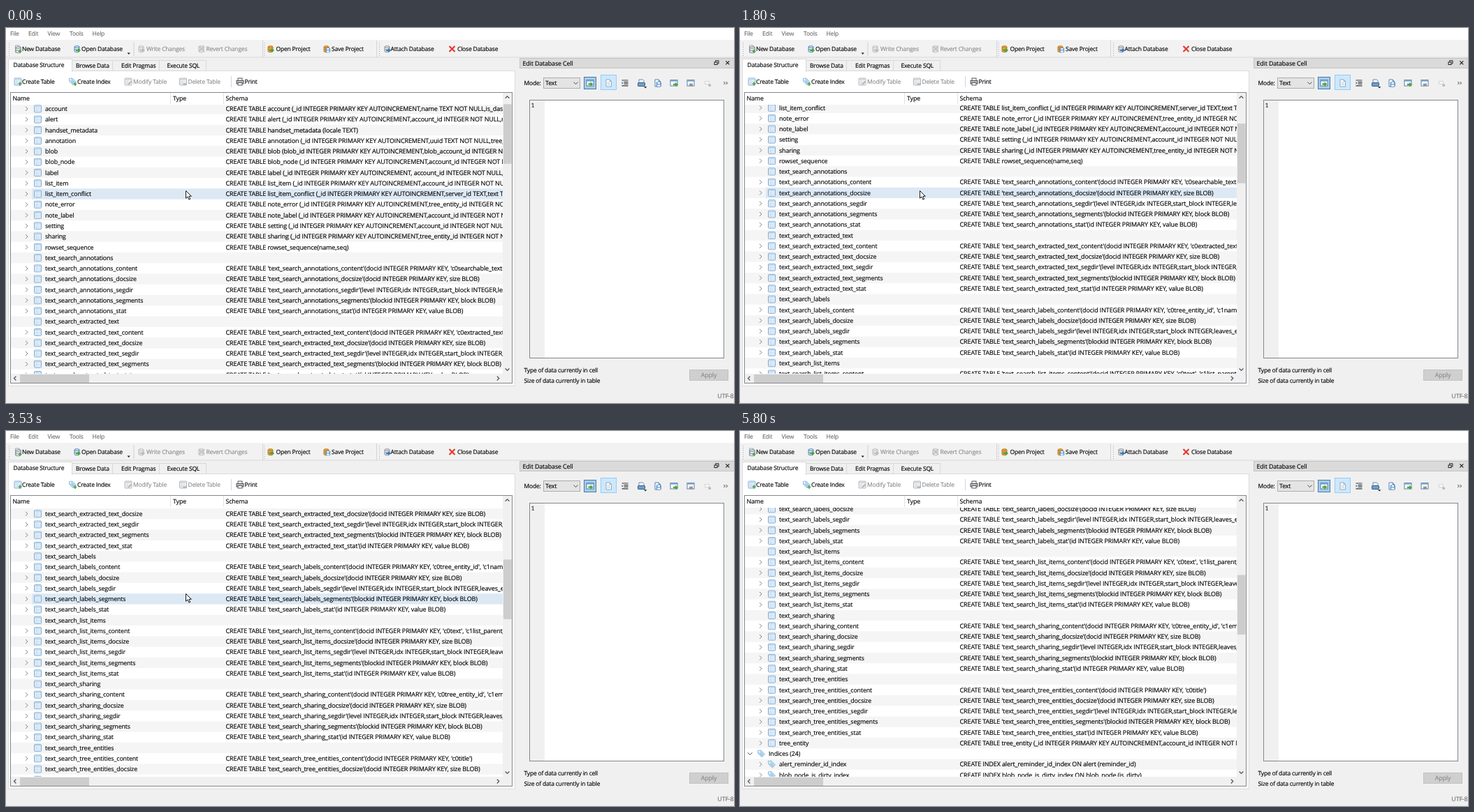
Write an HTML page that moves like this. It is 1042x538 px and loops after 6790 ms.

```html
<!DOCTYPE html>
<html lang="en">
<head>
<meta charset="utf-8">
<title>Database structure</title>
<style>
html, body { margin: 0; width: 100%; height: 100%; overflow: hidden; background: #f0f0f0; }
svg { display: block; }
text {
  font: 8.8px "Open Sans", "Noto Sans", sans-serif; letter-spacing: -.1px; white-space: pre;
  text-rendering: geometricPrecision; fill: currentColor; stroke: currentColor; stroke-width: .15px;
}
text.ui { font-size: 8.5px; letter-spacing: -.2px; }
text.sql { font-size: 9px; letter-spacing: -.12px; }
text.mono { font: 8.5px "Noto Sans Mono", "DejaVu Sans Mono", monospace; }
</style>
</head>
<body>
<svg id="stage" width="1042" height="538" viewBox="0 0 1042 538" xmlns="http://www.w3.org/2000/svg"></svg>
<script>
const LOOP = 6790, TICK = 200 / 3;
const ROW = 15.265, TOP = 108.3;
const LEFT = 7, RIGHT = 711;

// Scroll offsets and pointer heights, one value per tick from each start tick.
const SCROLL = [
  [1, [2, 6]],
  [4, [9, 15, 24, 34, 44, 53, 60, 64]],
  [19, [68, 74, 81, 88, 96, 104, 111, 118, 123.7, 127, 129]],
  [34, [134, 146, 164, 184, 203, 218, 226]],
  [47, [231.8, 246, 267, 290, 312, 326, 333]],
  [60, [339, 354, 375, 396, 414, 426, 431.5]]
];
const POINTER = [
  [77, [246, 296, 368, 430, 456.5]],
  [85, [484, 518, 560]]
];

// Drawing helpers
const rect = (x, y, w, h, fill, stroke = 'none', more = '') =>
  `<rect x="${x}" y="${y}" width="${w}" height="${h}" fill="${fill}" stroke="${stroke}" ${more}/>`;
const path = (d, stroke, fill = 'none', width = 1) =>
  `<path d="${d}" stroke="${stroke}" fill="${fill}" stroke-width="${width}"/>`;
const circle = (x, y, r, fill, stroke = 'none') =>
  `<circle cx="${x}" cy="${y}" r="${r}" fill="${fill}" stroke="${stroke}"/>`;
const text = (x, y, s, color = '#000', cls = '', more = '') =>
  `<text x="${x}" y="${y}" color="${color}" class="${cls}" ${more}>${s}</text>`;
const ui = (x, y, s, color, more) => text(x, y, s, color, 'ui', more);
const at = (x, y, s) => `<g transform="translate(${x} ${y})">${s}</g>`;
const vline = (x, y, h, color) => rect(x, y, 1, h, color);

// Icons, each centred on 0,0
const icon = {
  grid: (edge = '#86add3', fill = '#e3effa', head = '#c3dbf1') =>
    rect(-5, -5, 10, 10, fill, edge, 'rx=".8"') + rect(-4.5, -4.5, 9, 2.2, head) +
    path('M-4.5 .3H4.5M-4.5 2.7H4.5M-1.5 -2V4.5', '#c6d9ea', 'none', .7),
  tag: () => path('M-5.2 -4.6L-.6 -5L5 .8L.8 5L-4.8 -.4Z', '#86b4d8', '#b9dcf3', .8) +
    circle(-3.3, -2.9, 1, '#fff') + path('M-1 -1.6L2.4 2M-2 0L1 2.8', '#7fa9cc', 'none', .7),
  drum: (edge = '#7d8790', fill = '#dfe5ea') =>
    path('M-4 -3V3.5C-4 5.2 3 5.2 3 3.5V-3C3 -4.8 -4 -4.8 -4 -3C-4 -1.4 3 -1.4 3 -3', edge, fill, .9) +
    path('M-4 .3C-4 1.8 3 1.8 3 .3', edge, 'none', .8),
  page: (edge = '#8aa0b5') => path('M-3.5 -5H1.5L4 -2.5V5H-3.5Z', edge, '#fff', .9) +
    path('M1.5 -5V-2.5H4', edge, 'none', .8),
  lines: color => path('M-2 -1H2.5M-2 .8H2.5M-2 2.6H2.5', color, 'none', .8),
  arrow: (color, x = 1, y = 2) => at(x, y, path('M-3 -1.2H0V-3.2L4 0L0 3.2V1.2H-3Z', 'none', color)),
  disk: (edge, fill) => rect(-4.5, -4.5, 9, 9, fill, edge, 'rx="1"') +
    rect(-2.5, -4.3, 5, 3, '#fff') + rect(-3, .8, 6, 3.6, '#f4f7fa'),
  plus: (color, x, y) => at(x, y, path('M-2.4 0H2.4M0 -2.4V2.4', color, 'none', 1.6)),
  cross: color => path('M-4 -4L4 4M4 -4L-4 4', color, 'none', 2.2)
};

function tableRows() {
  const id = '(_id INTEGER PRIMARY KEY AUTOINCREMENT,';
  const account = id + 'account_id INTEGER NOT NULL,remote_id TEXT';
  const entity = id + 'tree_entity_id INTEGER NOT NULL,remote_id TEXT';
  const plain = [
    ['account', id + 'name TEXT NOT NULL,is_dasher INTEGER'],
    ['alert', account],
    ['handset_metadata', '(locale TEXT)'],
    ['annotation', id + 'uuid TEXT NOT NULL,tree_entity_id INTEGER'],
    ['blob', '(blob_id INTEGER PRIMARY KEY AUTOINCREMENT,blob_account_id INTEGER NOT NULL'],
    ['blob_node', account],
    ['label', id + ' account_id INTEGER NOT NULL, uuid TEXT'],
    ['list_item', account],
    ['list_item_conflict', id + 'server_id TEXT,text TEXT'],
    ['note_error', entity],
    ['note_label', account],
    ['setting', account],
    ['sharing', entity]
  ];
  const make = ([name, body]) => ({ name, sql: `CREATE TABLE ${name} ${body}` });
  const rows = plain.map(make);
  rows.push({ name: 'rowset_sequence', sql: 'CREATE TABLE rowset_sequence(name,seq)' });
  const search = {
    annotations: "'c0searchable_text', 'c1uuid')",
    extracted_text: "'c0extracted_text', 'c1uuid')",
    labels: "'c0tree_entity_id', 'c1name')",
    list_items: "'c0text', 'c1list_parent_id')",
    sharing: "'c0tree_entity_id', 'c1email')",
    tree_entities: "'c0title')"
  };
  for (const [key, content] of Object.entries(search)) {
    const base = 'text_search_' + key;
    const parts = {
      content: 'docid INTEGER PRIMARY KEY, ' + content,
      docsize: 'docid INTEGER PRIMARY KEY, size BLOB)',
      segdir: 'level INTEGER,idx INTEGER,start_block INTEGER,leaves_end_block INTEGER)',
      segments: 'blockid INTEGER PRIMARY KEY, block BLOB)',
      stat: 'id INTEGER PRIMARY KEY, value BLOB)'
    };
    rows.push({ name: base });
    for (const p in parts)
      rows.push({ name: `${base}_${p}`, sql: `CREATE TABLE '${base}_${p}'(${parts[p]}` });
  }
  rows.push(make(['tree_entity', account]));
  return rows;
}

const rows = tableRows();
const HEAD = rows.length;
rows.push({ name: 'Indices (24)' });
for (const [name, on] of [
  ['alert_reminder_id_index', 'alert (reminder_id)'],
  ['blob_node_is_dirty_index', 'blob_node (is_dirty)'],
  ['blob_node_tree_entity_id_index', 'blob_node (tree_entity_id)']
]) rows.push({ name, sql: `CREATE INDEX ${name} ON ${on}`, tag: true });

const rowTop = i => TOP + i * ROW;

function rowArt(row, i) {
  const y = rowTop(i), mid = y + ROW / 2;
  if (i === HEAD)
    return path(`M11 ${mid - 1.6}l3.2 3.2l3.2 -3.2`, '#404040') +
      at(30.5, mid, icon.tag()) + text(41, y + 10.8, row.name);
  return (row.sql ? path(`M28 ${mid - 3}l3 3l-3 3`, '#808080') : '') +
    at(45.5, mid, row.tag ? icon.tag() : icon.grid()) +
    text(56, y + 10.8, row.name) + text(314.5, y + 10.8, row.sql || '', '#000', 'sql');
}

function menuAndToolbar() {
  let s = rect(0, 0, 1042, 17, '#fff');
  [[6, 'File'], [32, 'Edit'], [59.5, 'View'], [91, 'Tools'], [123.5, 'Help']]
    .forEach(([x, label]) => s += ui(x, 11.3, label, '#707070'));
  s += rect(0, 17, 1042, 25, '#f2f2f2') + rect(0, 41.5, 1042, 1, '#dadada');
  for (const x of [367, 530]) s += vline(x, 18, 24, '#d5d5d5');
  for (const x of [4, 369.5, 534])
    for (let y = 21; y < 40; y += 3) s += rect(x, y, 1, 1, '#a9a9a9');
  s += vline(182.5, 20, 20, '#d0d0d0');
  const off = '#8c8c8c', green = '#4aa53c', blue = '#3f78b5', gold = '#e8a33d';
  const tools = [
    [17, 23, 'New Database', icon.page() + at(1, 1, icon.drum()) + icon.plus(green, 3, 3.5)],
    [102, 108, 'Open Database', icon.drum(blue, '#dce9f6') + icon.arrow(green)],
    [194, 201, 'Write Changes', icon.drum('#b5b5b5', '#ececec') + icon.arrow('#bdbdbd'), off],
    [280, 286.5, 'Revert Changes', icon.drum('#b5b5b5', '#ececec') + icon.cross('#c6c6c6'), off],
    [379, 386.5, 'Open Project', icon.drum('#b57a27', gold) + icon.arrow(green)],
    [459, 466, 'Save Project', icon.drum('#b57a27', gold) + at(1.8, 1.8, `<g transform="scale(.65)">${icon.disk(blue, '#6ea2d6')}</g>`)],
    [546, 550.5, 'Attach Database', icon.drum() + icon.arrow(blue)],
    [638.5, 646, 'Close Database', icon.cross('#e23b30')]
  ];
  for (const [ix, x, label, art, color] of tools) s += at(ix, 30, art) + ui(x, 33, label, color);
  return s + path('M173.5 35.5h4.4l-2.2 2.4Z', 'none', '#222');
}

function tabsAndPanel() {
  let s = rect(3.5, 61.5, 725, 452, '#fff', '#dcdcdc');
  for (const [x, w, tx, label] of [
    [94.5, 58, 100, 'Browse Data'], [152.5, 67, 165, 'Edit Pragmas'], [219.5, 67, 230.5, 'Execute SQL']
  ]) s += rect(x, 46.5, w, 15, '#f0f0f0', '#d9d9d9') + ui(tx, 56.5, label);
  s += rect(3.5, 44.5, 91, 18, '#fff', '#d9d9d9') + rect(4, 61, 90, 2.5, '#fff') +
    ui(10.5, 56.3, 'Database Structure');
  const gray = () => icon.grid('#b8b8b8', '#f2f2f2', '#d5d5d5'), off = '#8c8c8c';
  const tools = [
    [17, 23, 'Create Table', icon.grid() + icon.plus('#4aa53c', 3, 3)],
    [95.5, 102, 'Create Index', icon.tag() + icon.plus('#4aa53c', 3.5, 3.5)],
    [175, 182, 'Modify Table', gray() + path('M0 4L4.5 -.5', '#aaa', 'none', 1.6), off],
    [253.5, 260.5, 'Delete Table', gray() + path('M0 3.5H5', '#aaa', 'none', 1.8), off],
    [335, 341.5, 'Print', rect(-3, -5, 6, 4, '#fff', '#555') + rect(-5, -1.5, 10, 4.5, '#b9c0c8', '#4d545b') + rect(-3, 1.5, 6, 3.5, '#fff', '#555')]
  ];
  for (const [ix, x, label, art, color] of tools) s += at(ix, 77, art) + ui(x, 80, label, color);
  return s + vline(322, 69, 16, '#d5d5d5') + rect(6.5, 92.5, 718, 417, '#fff', '#828790');
}

function treeFrame() {
  let s = rect(LEFT, 93, RIGHT - LEFT, 17, '#fff');
  s += text(9.5, 104.2, 'Name') + text(239, 104.2, 'Type') + text(314.5, 104.2, 'Schema');
  s += vline(235, 93, 16, '#e2e2e2') + vline(311, 93, 16, '#e2e2e2');
  s += rect(RIGHT, 93, 13, 416, '#f0f0f0') + rect(LEFT, 496, 717, 13, '#f0f0f0');
  s += rect(20, 497, 99, 12, '#cdcdcd');
  const c = '#555';
  return s + path('M714.6 100.7l2.9 -2.9l2.9 2.9', c, 'none', 1.3) + path('M714.6 488.5l2.9 2.9l2.9 -2.9', c, 'none', 1.3) +
    path('M14.4 499.7l-2.9 2.9l2.9 2.9', c, 'none', 1.3) + path('M702.8 499.7l2.9 2.9l-2.9 2.9', c, 'none', 1.3);
}

function dock() {
  let s = rect(735.5, 43.5, 307, 14, '#dadada', '#c4c4c4') + text(739.5, 53.6, 'Edit Database Cell');
  s += rect(1014, 49, 4, 3.5, 'none', '#222') + path('M1015.5 48.5V46.8H1020V51H1018.5', '#222') +
    path('M1030.3 47.3l5 5M1035.3 47.3l-5 5', '#222', 'none', 1.2);
  s += ui(741.5, 82.3, 'Mode:') + rect(769.5, 71.5, 52, 15, '#e4e4e4', '#adadad') + text(772, 82.3, 'Text') +
    path('M812.5 77.6l3 3l3 -3', '#444');
  s += rect(827.5, 70.5, 17, 17, '#a9cbe6', '#3f7fb5') + rect(851.5, 67.5, 22, 21, '#cce8ff', '#99cbee');
  const blue = '#3f78b5', green = '#4aa53c';
  const sheet = rect(-5, -4.5, 10, 8.5, '#fff', '#5a7fa6') + rect(-5, -4.5, 10, 2.2, '#7da7d3');
  const tray = path('M-3.5 0V-5H2L3.5 -3.5V0', '#5a7fa6', '#fff', .9) +
    rect(-5, -.5, 10, 5, '#6f9fce', '#35587d', 'rx=".8"');
  const art = [
    [836, sheet + icon.arrow(green, .5, 1.5)],
    [862.5, icon.page() + icon.lines('#b6c5d4')],
    [886, path('M-4.5 -4H4.5M-1.5 -1.4H4.5M-1.5 1.2H4.5M-4.5 3.8H4.5', '#333', 'none', 1.2) + path('M-4.5 -2L-2.3 -.1L-4.5 1.8Z', 'none', blue)],
    [909.5, tray + path('M3.5 5.3h4.4l-2.2 2.3Z', 'none', '#222')],
    [932.5, icon.page(blue) + at(1.8, 1.8, `<g transform="scale(.7)">${icon.disk(blue, '#72a6da')}</g>`)],
    [956, sheet + icon.arrow(green, 2, 2)],
    [980, sheet + path('M-2 1.5H3M-2 3.2H3', '#555', 'none', 1.1)],
    [1004, rect(-3.5, -2.5, 6, 4, '#f7f7f7', '#d5d5d5') + circle(3.2, 3.2, 1.9, '#b9b9b9')]
  ];
  for (const [x, a] of art) s += at(x, 79, a);
  s += path('M1027.3 77l2 2l-2 2M1030.6 77l2 2l-2 2', '#333', 'none', .9);
  s += rect(749.5, 103.5, 278, 370, '#fff', '#828790') + rect(750, 104, 21, 369, '#f0f0f0') +
    text(751.5, 114, '1', '#222', 'mono');
  s += ui(741.5, 494.3, 'Type of data currently in cell') + ui(741.5, 509, 'Size of data currently in table');
  s += rect(978.5, 490.5, 55, 15, '#cfcfcf', '#c2c2c2') + text(1006, 501.3, 'Apply', '#8a8a8a', '', 'text-anchor="middle"');
  return s + text(1041.5, 531.3, 'UTF-8', '#707070', '', 'text-anchor="end"');
}

const stripes = rows.map((r, i) => i % 2 ? '' : rect(LEFT, rowTop(i), RIGHT - LEFT, ROW, '#f5f5f5')).join('');
document.getElementById('stage').innerHTML =
  `<clipPath id="view">${rect(LEFT, 110, RIGHT - LEFT, 386, '#000')}</clipPath>` +
  rect(0, 0, 1042, 538, '#f0f0f0') + menuAndToolbar() + tabsAndPanel() +
  `<g clip-path="url(#view)"><g id="list">${stripes}<rect id="hover" height="${ROW}"/>${rows.map(rowArt).join('')}</g></g>` +
  treeFrame() + `<rect id="thumb" x="712" width="11.5" height="85.5" fill="#cdcdcd"/>` + dock() +
  `<g id="pointer">${path('M.5 .5V11.3L3 9L4.9 13.2L6.7 12.4L4.9 8.3H8.3Z', '#000', '#fff', .9)}</g>`;

const [list, hover, thumb, pointer] = ['list', 'hover', 'thumb', 'pointer'].map(id => document.getElementById(id));

function valueAt(track, tick, value) {
  for (const [start, steps] of track)
    if (tick >= start) value = steps[Math.min(tick - start, steps.length - 1)];
  return value;
}

// Ticks fall on whole hundredths of a second.
function tickAt(t) {
  const k = Math.round(t / TICK);
  return Math.round(k * TICK / 10) * 10 > t ? k - 1 : k;
}

function draw(t) {
  const tick = tickAt(t);
  const scroll = valueAt(SCROLL, tick, 0), y = valueAt(POINTER, tick, 233);
  const row = Math.floor((y + .5 - TOP + scroll) / ROW);
  const x = row === HEAD ? 22 : 37;
  list.setAttribute('transform', `translate(0 ${-scroll})`);
  hover.setAttribute('x', x);
  hover.setAttribute('y', rowTop(row));
  hover.setAttribute('width', RIGHT - x);
  hover.setAttribute('fill', row % 2 ? '#e5f3ff' : '#dce9f5');
  hover.setAttribute('visibility', y < 496 ? 'visible' : 'hidden');
  thumb.setAttribute('y', 109.3 + scroll * .2255);
  pointer.setAttribute('transform', `translate(257 ${y})`);
}

const begin = performance.now();
function frame() {
  draw((performance.now() - begin) % LOOP);
  requestAnimationFrame(frame);
}
draw(0);
requestAnimationFrame(frame);
</script>
</body>
</html>
```
